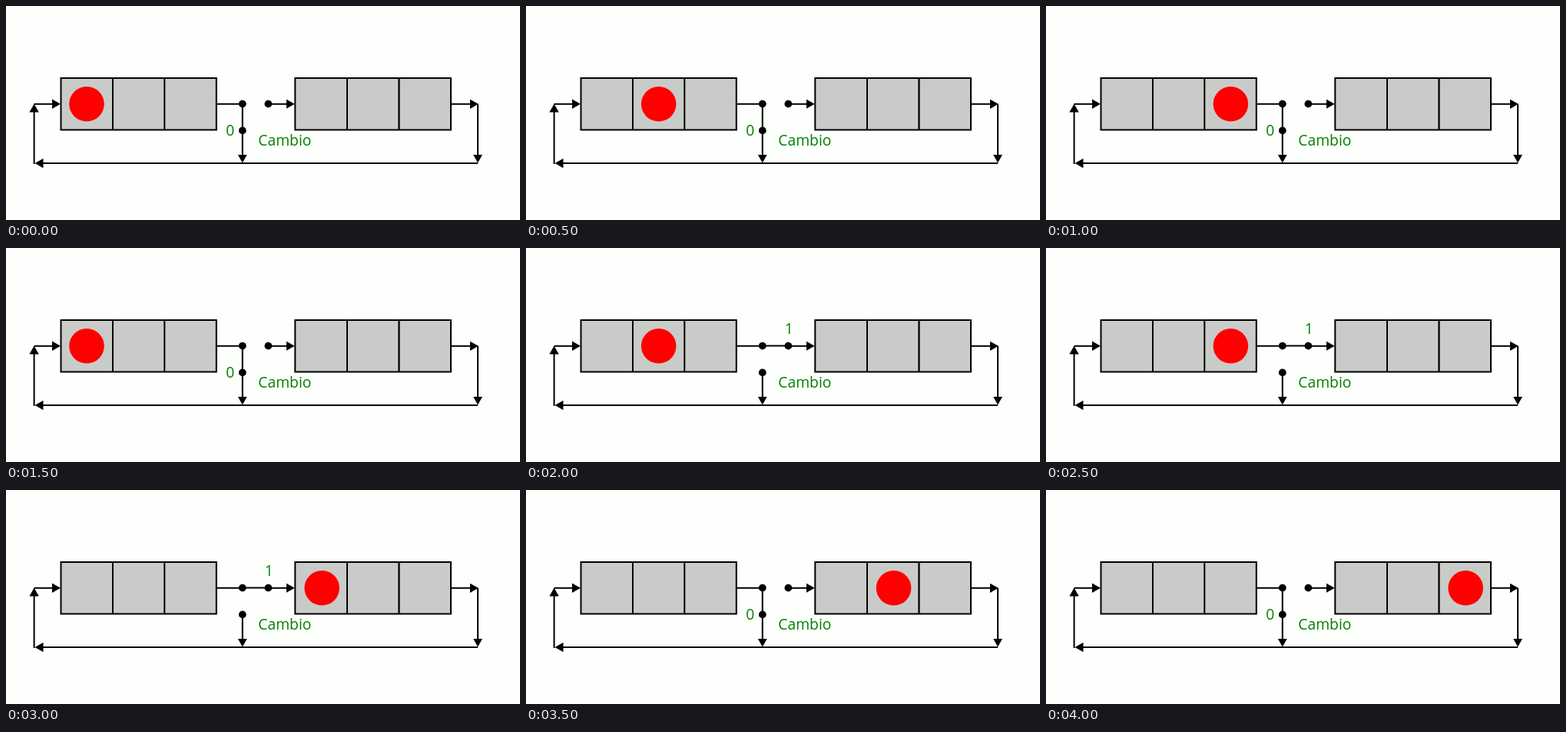
Animation, 669 px wide and 279 px high, one loop 4500 ms. Source, as an HTML page:

```html
<!DOCTYPE html>
<html lang="es">
<head>
<meta charset="utf-8">
<style>
  html, body { margin: 0; width: 100%; height: 100%; overflow: hidden; background: #fdfffc; }
  svg { display: block; }
  .cells { fill: #c9cbc8; stroke: #000; stroke-width: 2; }
  .wire { fill: none; stroke: #000; stroke-width: 2; }
  text { font: 19.3px "Open Sans", "Noto Sans", sans-serif; fill: #008000; }
</style>
</head>
<body>
<svg width="669" height="279" viewBox="0 0 669 279">
  <defs>
    <marker id="head" markerUnits="userSpaceOnUse" markerWidth="11" markerHeight="13"
            refX="11" refY="6.5" orient="auto">
      <path d="M0 .3L11 6.5L0 12.7Z"/>
    </marker>
  </defs>
  <path class="cells" d="M71.5 94H273.8V161.5H71.5ZM139 94V161.5M206.3 94V161.5"/>
  <path class="cells" d="M376.3 94H579V161.5H376.3ZM444 94V161.5M511.5 94V161.5"/>
  <path class="wire" d="M444 94V161.5M511.5 94V161.5" stroke-opacity=".5"/>
  <path class="wire" d="M274 127.8H308"/>
  <g id="arrows" class="wire"></g>
  <circle cx="307.8" cy="127.6" r="4.9"/>
  <circle cx="307.8" cy="162.4" r="4.9"/>
  <circle cx="341.4" cy="127.6" r="4.9"/>
  <path id="link" class="wire"/>
  <text x="328.3" y="182.3">Cambio</text>
  <text id="bit" text-anchor="middle"></text>
  <circle id="token" cy="127.8" r="22.8" fill="#f00"/>
</svg>
<script>
  const get = id => document.getElementById(id);
  const STEP = 500;
  const cellX = [105, 172.7, 240.4, 411.2, 478.6, 546.2];
  const visited = [0, 1, 2, 0, 1, 2, 3, 4, 5];

  // Each arrow: shaft path up to the base of its head, then on to the tip.
  const arrows = [
    "M36.5 127.8H71", "M341.4 127.8H375.7", "M579 127.8H614.8",
    "M307.8 162.4V204.5", "M614.1 127.8V204.5",
    "M614.1 205H37.5", "M36.6 206V127.5"
  ];
  for (const d of arrows) {
    const ns = "http://www.w3.org/2000/svg";
    const shaft = document.createElementNS(ns, "path");
    shaft.setAttribute("d", d);
    shaft.setAttribute("marker-end", "url(#head)");
    get("arrows").append(shaft);
    // Stop the shaft inside the head so the tip stays sharp.
    shaft.setAttribute("stroke-dasharray", `${shaft.getTotalLength() - 5} 99`);
  }

  function draw() {
    const step = Math.floor(performance.now() / STEP) % visited.length;
    const closed = step >= 4 && step <= 6;
    get("token").setAttribute("cx", cellX[visited[step]]);
    get("link").setAttribute("d", closed ? "M307.8 127.6H341.4" : "M307.8 127.6V162.4");
    get("bit").textContent = closed ? "1" : "0";
    get("bit").setAttribute("x", closed ? 342.3 : 291.8);
    get("bit").setAttribute("y", closed ? 111.8 : 168.6);
    requestAnimationFrame(draw);
  }
  draw();
</script>
</body>
</html>
```
